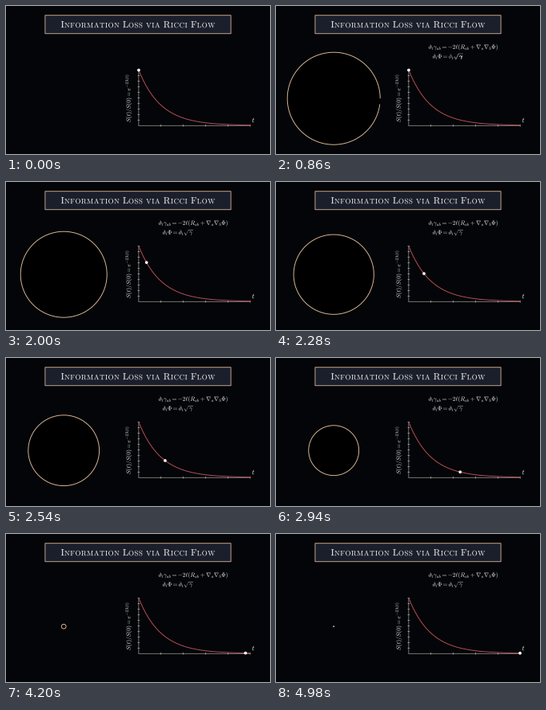
Write a matplotlib script that moves like this. It is 330x186 px and loops after 5000 ms.

```python
import numpy as np
import matplotlib.pyplot as plt
from matplotlib.animation import FuncAnimation
from matplotlib.patches import Circle, PathPatch, Rectangle
from matplotlib.path import Path
from matplotlib.textpath import TextPath
from matplotlib.transforms import Affine2D

plt.rcParams["mathtext.fontset"] = "cm"

W, H, DPI = 330, 186, 100
PX = 72 / DPI                     # points per pixel
UNIT = W * 9 / 128                # pixels per scene unit
STROKE = 0.04 * UNIT * PX
FRAMES, STEP = 250, 20
BG, TAN, RED, INK = "#040508", "#dfbd9c", "#bd525c", "#f0f0f0"

fig = plt.figure(figsize=(W / DPI, H / DPI), dpi=DPI, facecolor=BG)
ax = fig.add_axes([0, 0, 1, 1])
ax.set_xlim(0, W)
ax.set_ylim(H, 0)
ax.axis("off")


def smooth(t):
    """Normalised sigmoid ease in and out."""
    sig = lambda v: 1 / (1 + np.exp(-v))
    t = np.clip(t, 0, 1)
    return (sig(10 * (t - 0.5)) - sig(-5)) / (1 - 2 * sig(-5))


def line(x, y, color, width):
    ax.plot(x, y, color=color, lw=width, snap=False)


def place(path, x, y, left=False, turn=0):
    """Flip a text path to screen space and set it around (x, y)."""
    path = path.transformed(Affine2D().rotate_deg(turn).scale(1, -1))
    box = path.get_extents()
    ref = box.x0 if left else (box.x0 + box.x1) / 2
    return path.transformed(
        Affine2D().translate(x - ref, y - (box.y0 + box.y1) / 2))


def tex(code, em):
    big = TextPath((0, 0), f"${code}$", size=100)
    return big.transformed(Affine2D().scale(em / 100))


def small_caps(text, em):
    parts, x = [], 0
    for word in text.split():
        n = 1 if word[0].isupper() else 0
        for chars, size in ((word[:n], em), (word[n:].upper(), 0.765 * em)):
            if chars:
                run = tex(r"\mathrm{%s}" % r"\hspace{.062}".join(chars), size)
                box = run.get_extents()
                parts.append(run.transformed(Affine2D().translate(x - box.x0, 0)))
                x += box.width + 0.07 * em
        x += 0.34 * em
    return Path.make_compound_path(*parts)


def draw(path):
    ax.add_patch(PathPatch(path, fc=INK, lw=0, snap=False))


def glyphs(path):
    """Group the outlines of a text path, keeping holes with their letter."""
    groups = []
    big = path.transformed(Affine2D().scale(20))
    for poly in big.to_polygons():
        poly = np.asarray(poly) / 20
        lo, hi = poly.min(0), poly.max(0)
        if groups:
            outer = groups[-1][0]
            if (lo >= outer.min(0)).all() and (hi <= outer.max(0)).all():
                groups[-1].append(poly)
                continue
        groups.append([poly])
    return groups


# Title
ax.add_patch(Rectangle((48.9, 11.7), 232.2, 23, fc="#1b1f2b", ec="#cbac92",
                       lw=STROKE, snap=False))
draw(place(small_caps("Information Loss via Ricci Flow", 11.7), 165, 23.2))

# Axes and decay curve
X0, Y0, XLEN, YLEN = 165.9, 150.2, 6 * UNIT, 3 * UNIT
TICK = 0.05 * UNIT
line([X0, X0 + XLEN], [Y0, Y0], INK, STROKE / 2)
line([X0, X0], [Y0, Y0 - YLEN], INK, STROKE / 2)
for x in X0 + XLEN * np.arange(1, 6) / 5:
    line([x, x], [Y0 - TICK, Y0 + TICK], INK, STROKE / 2)
for y in Y0 - YLEN * np.arange(1, 11) / 10:
    line([X0 - TICK, X0 + TICK], [y, y], INK, STROKE / 2)


def curve(s):
    return X0 + XLEN * s, Y0 - YLEN * np.exp(-5 * s)


line(*curve(np.linspace(0, 1, 200)), RED, STROKE)
draw(place(tex(r"S(t)/S(0)=e^{-2\Lambda(t)}", 7.5), 153.1, 116.2, turn=90))
draw(place(tex("t", 8.6), 309, 143.6))

# Moving parts
CX, CY, R0, R1 = W / 2 - 4 * UNIT, H / 2 + UNIT, 2.5 * UNIT, 0.02 * UNIT
disc = ax.add_patch(PathPatch(Path([(CX, CY)] * 2), fc="black", ec=TAN,
                              lw=STROKE, capstyle="butt", snap=False))
dot = ax.add_patch(Circle((X0, Y0), 0.08 * UNIT, fc="white", lw=0, zorder=5))

EQUATIONS = (
    (r"\partial_t\gamma_{ab}={-}2\ell(R_{ab}+\nabla_a\nabla_b\Phi)", 191, 51.9),
    (r"\partial_t\Phi=\partial_t\sqrt{\gamma}", 196, 63.6),
)
letters = [g for code, x, y in EQUATIONS
           for g in glyphs(place(tex(code, 7.5), x, y, left=True))]
pens = [ax.add_patch(PathPatch(Path(g[0]), snap=False)) for g in letters]
LAG = min(4 / (len(letters) + 1), 0.2)


def write(a):
    """Trace each letter's outline, then fill it, one after another."""
    total = 1 + LAG * (len(letters) - 1)
    for i, (pen, polys) in enumerate(zip(pens, letters)):
        u = np.clip(a * total - i * LAG, 0, 1)
        pen.set_visible(u > 0)
        part, fill = min(2 * u, 1), max(2 * u - 1, 0)
        pen.set_path(Path.make_compound_path(
            *[Path(p[:max(2, int(round(part * len(p))))]) for p in polys]))
        pen.set_facecolor((0.94, 0.94, 0.94, fill))
        pen.set_edgecolor((0.94, 0.94, 0.94, 1 - fill))
        pen.set_linewidth(0.35 * STROKE * (1 - fill))


def update(i):
    t = i * STEP / 1000
    write(min(t, 1))

    grown, s = smooth(t), smooth((t - 1) / 4)
    r = R0 + (R1 - R0) * s
    ang = np.linspace(0, 2 * np.pi * grown, 181)
    pts = np.column_stack([CX + r * np.cos(ang), CY - r * np.sin(ang)])
    codes = [Path.MOVETO] + [Path.LINETO] * 180
    if t >= 1:
        codes[-1] = Path.CLOSEPOLY
    disc.set_path(Path(pts, codes))
    disc.set_visible(t > 0)

    dot.center = curve(s)
    return [disc, dot, *pens]


anim = FuncAnimation(fig, update, frames=FRAMES, interval=STEP,
                     init_func=lambda: update(0), repeat=True)
plt.show()
```
